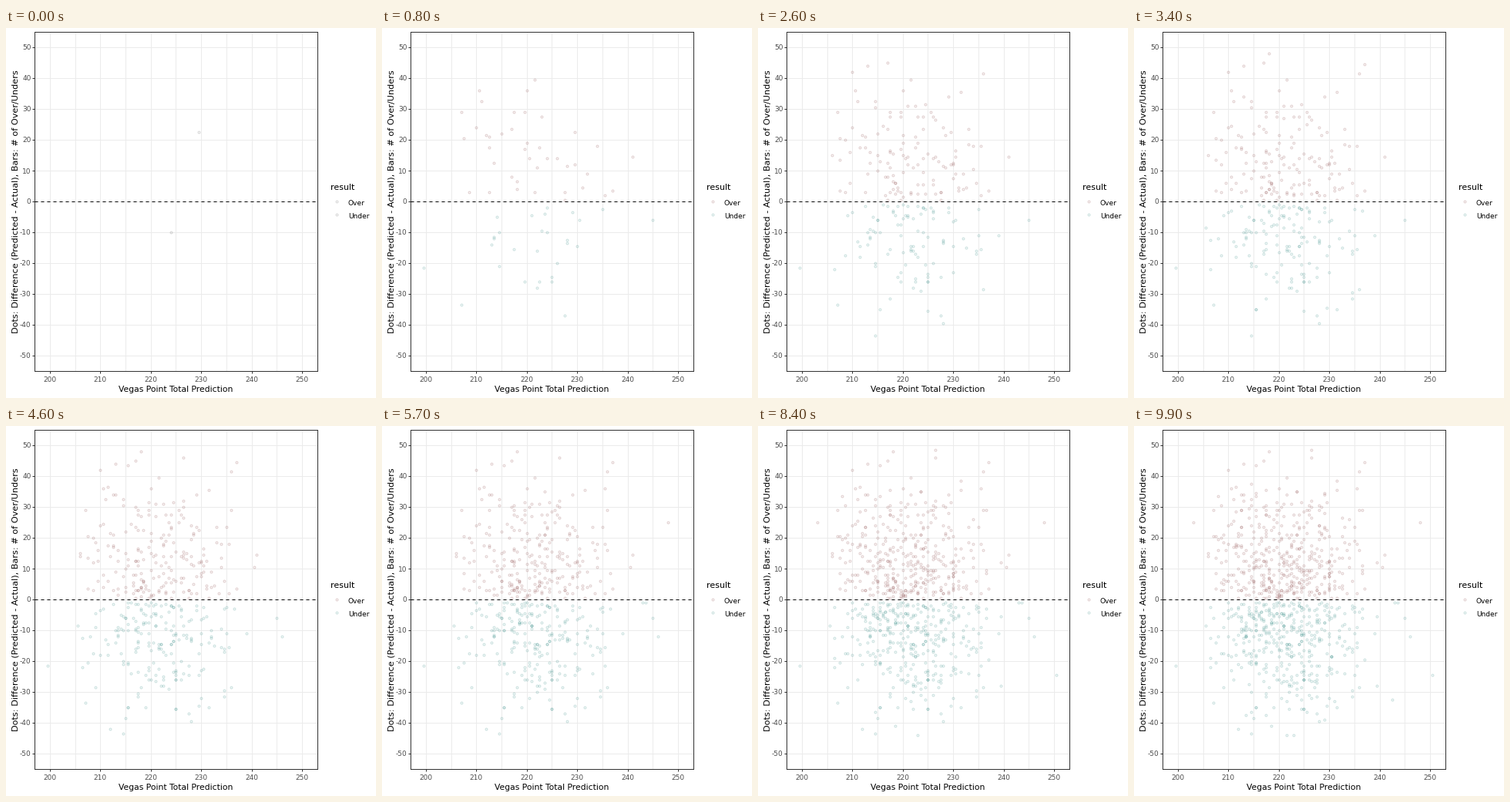
A matplotlib script that plays this animation: 480x480 px, repeating every 10 s.

```python
import numpy as np
import matplotlib.pyplot as plt
from matplotlib.animation import FuncAnimation

SIZE, DPI, FRAMES = 480, 80, 100
PX = 72 / DPI  # points per pixel
OVER, UNDER, GREY = "#701c1c", "#007068", "#404040"
ALPHA = 0.23
TOTAL = 880  # games on screen at the end

# Opening pair and the widest results: (frame of arrival, total, difference)
KEY_GAMES = [(0, 229.5, 22.5), (0, 224, -10), (4, 199.5, -21.5), (8, 245, -6),
             (28, 218, 48), (70, 250.5, -24.5), (80, 226.5, 48.5)]


def make_games(seed=4):
    """Normal spread with a few wide lines, on half points, at a steady rate."""
    rng = np.random.default_rng(seed)
    games = list(KEY_GAMES)
    while len(games) < TOTAL:
        wide = rng.random() < 0.06
        x = round(2 * rng.normal(221, 14 if wide else 8.3)) / 2
        y = round(2 * rng.normal(0, 17.5)) / 2
        low, high = (201, 248) if wide else (206, 237)
        if low <= x <= high and (0.5 <= y <= 47 or -44 <= y <= -1):
            games.append((1 + len(games) * (FRAMES - 1) // TOTAL, x, y))
    return np.array(sorted(games))


def label(x, y, text, size, color="black", **kw):
    """Text at a pixel position measured from the top left."""
    kw = {"ha": "center", "va": "center_baseline", **kw}
    fig.text(x / SIZE, 1 - y / SIZE, text, fontsize=size * PX, color=color, **kw)


def dots(x, y, color, **kw):
    return plt.Line2D(x, y, ls="", marker="o", ms=2.84 * PX, mfc="none",
                      mec=color, mew=0.94 * PX, alpha=ALPHA, **kw)


fig = plt.figure(figsize=(SIZE / DPI, SIZE / DPI), dpi=DPI, facecolor="white")
ax = fig.add_axes([37 / SIZE, 35 / SIZE, 367 / SIZE, 440 / SIZE])
ax.set(xlim=(196.95, 253.05), ylim=(-55, 55),
       xticks=range(200, 251, 10), yticks=range(-50, 51, 10))
ax.set_xticks(range(205, 250, 10), minor=True)
ax.set_axisbelow(True)
ax.grid(which="both", color="#ebebeb", lw=PX)
ax.tick_params(length=3 * PX, width=PX, color="#333333",
               labelbottom=False, labelleft=False)
ax.tick_params(which="minor", length=0)
for spine in ax.spines.values():
    spine.set(color="#333333", linewidth=PX)
ax.axhline(0, color="black", lw=PX, ls=(0, (4, 4)), zorder=4)

for v in range(200, 251, 10):
    label(56.9 + (v - 200) * 6.542, 455.5, str(v), 9, "#4d4d4d")
for v in range(-50, 51, 10):
    label(32.5, 225 - 4 * v, str(v), 9, "#4d4d4d", ha="right")
label(220, 468.5, "Vegas Point Total Prediction", 10.8)
label(13, 225.5, "Dots: Difference (Predicted - Actual), Bars: # of Over/Unders",
      11.2, rotation=90, va="center")
label(421, 206.5, "result", 11, ha="left")

games = make_games()
series = []
for name, color, sign, key_y in (("Over", OVER, 1, 225), ("Under", UNDER, -1, 242)):
    cloud = ax.add_line(dots([], [], color, zorder=3))
    key = dots([429 / SIZE], [1 - key_y / SIZE], color, transform=fig.transFigure)
    fig.add_artist(key)
    label(444, key_y + 1.5, name, 9, ha="left")
    series.append((cloud, key, color, games[games[:, 2] * sign > 0]))


def update(i):
    for cloud, key, color, rows in series:
        shown = rows[rows[:, 0] <= i]
        cloud.set_data(shown[:, 1], shown[:, 2])
        for line in (cloud, key):
            line.set_markeredgecolor(color if i else GREY)
    return [s[0] for s in series]


anim = FuncAnimation(fig, update, frames=FRAMES, interval=100,
                     repeat=True, repeat_delay=0, blit=False)
plt.show()
```
